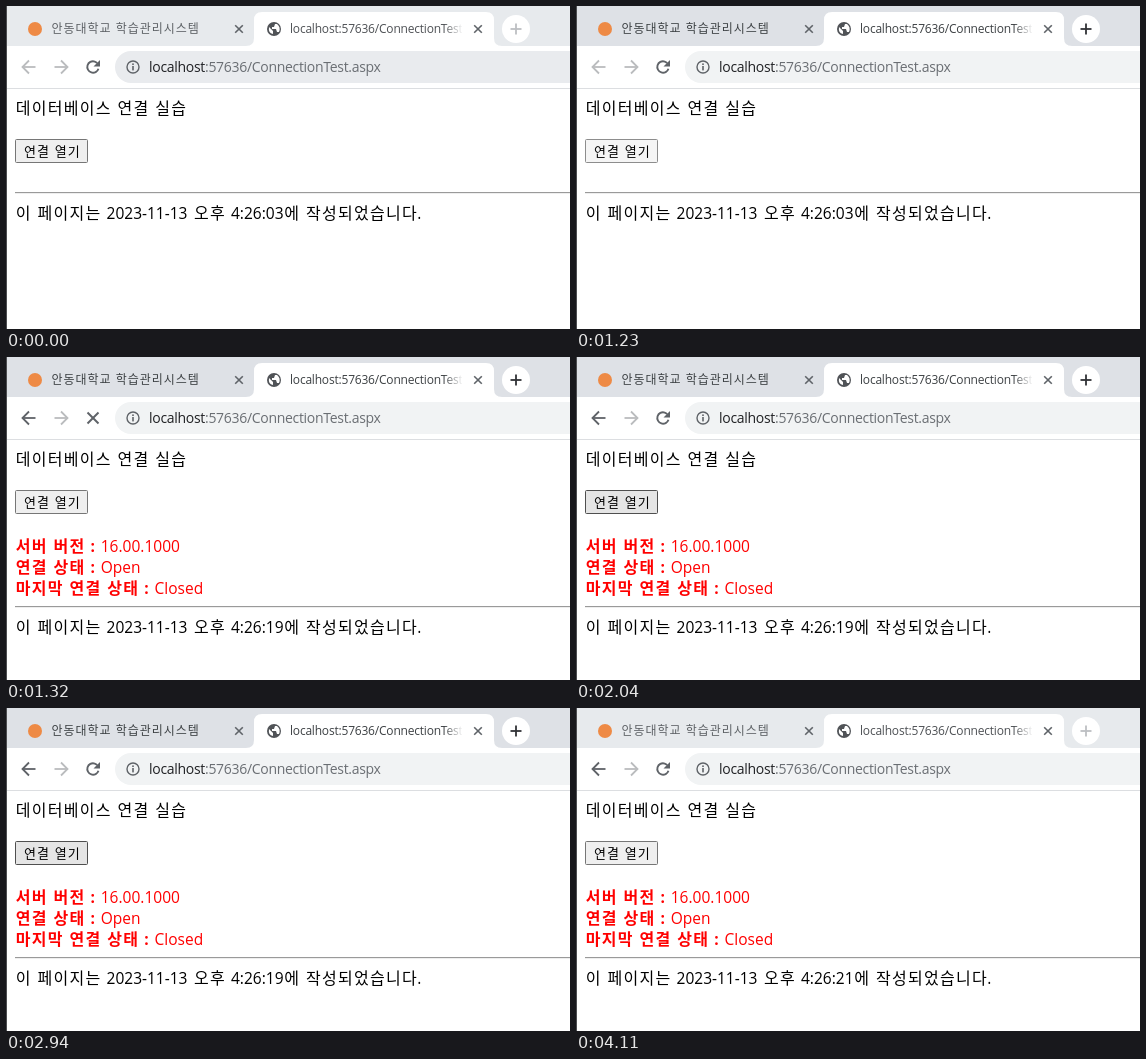
Recreate the animation shown at these times as an HTML page with a canvas. Size 564x323 px, loop 4.17 s.

```html
<!DOCTYPE html>
<html lang="ko">
<head>
<meta charset="utf-8">
<title>데이터베이스 연결 실습</title>
<style>
html, body { margin: 0; width: 100%; height: 100%; overflow: hidden; background: #fff; }
canvas { display: block; }
</style>
</head>
<body>
<canvas id="stage" width="564" height="323"></canvas>
<script>
const LOOP = 4170;
const ctx = document.getElementById('stage').getContext('2d', { alpha: false });
const LATIN = '"Open Sans", "Noto Sans", sans-serif';
const HANGUL = '"Noto Sans CJK KR", "Noto Sans CJK", sans-serif';
const ICON = '#5f6368', FAINT = '#babcbe';

const BUTTON = {
  normal: ['#efefef', '#767676'],
  hover: ['#e5e5e5', '#4f4f4f'],
  pressed: ['#f5f5f5', '#8d8d8d']
};

function rect(x, y, w, h, color) {
  ctx.fillStyle = color;
  ctx.fillRect(x, y, w, h);
}

function disc(x, y, r, color) {
  ctx.fillStyle = color;
  ctx.beginPath();
  ctx.arc(x, y, r, 0, Math.PI * 2);
  ctx.fill();
}

function line(points, color, width) {
  ctx.strokeStyle = color;
  ctx.lineWidth = width;
  ctx.beginPath();
  points.forEach(([x, y], i) => i ? ctx.lineTo(x, y) : ctx.moveTo(x, y));
  ctx.stroke();
}

function cross(x, y, r, color, width) {
  line([[x - r, y - r], [x + r, y + r]], color, width);
  line([[x - r, y + r], [x + r, y - r]], color, width);
}

function latin(str, x, y, size, color, weight = 400, spacing = 0) {
  ctx.fillStyle = color;
  ctx.font = `${weight} ${size}px ${LATIN}`;
  ctx.letterSpacing = spacing + 'px';
  ctx.fillText(str, x, y);
  const end = x + ctx.measureText(str).width;
  ctx.letterSpacing = '0px';
  return end;
}

// Hangul sits on a square pitch; Latin keeps its natural widths. Returns the end x.
function text(str, x, y, size, color, weight = 400) {
  for (const run of str.match(/[가-힣]+| +|[^가-힣 ]+/g)) {
    if (run[0] === ' ') {
      x += run.length * size * 0.36;
    } else if (/[가-힣]/.test(run)) {
      ctx.fillStyle = color;
      ctx.font = `${weight} ${size}px ${HANGUL}`;
      for (const ch of run) {
        ctx.fillText(ch, x + size * 0.04, y);
        x += size;
      }
    } else {
      x = latin(run, x, y, size * 0.97, color, weight);
    }
  }
  return x;
}

function globe(x, y) {
  disc(x, y, 7, '#505357');
  ctx.fillStyle = '#fff';
  ctx.fill(new Path2D(`M${x - 5} ${y - 2}l4 4v3q-5-1-4-7z
    M${x + 1} ${y - 5}l-1 3h-2v2h4l1 3h2q2-5-2-8z`));
}

function tabStrip(focused) {
  const idle = focused ? '#3c4043' : '#5d6165';
  const ink = focused ? '#3c4043' : '#4d5054';
  rect(0, 0, 564, 40, focused ? '#dee1e6' : '#e7eaed');
  ctx.fillStyle = '#fff';
  ctx.fill(new Path2D('M240 40q8 0 8-8V14q0-8 8-8H480q8 0 8 8V32q0 8 8 8z'));

  disc(29, 23, 7, '#ee8a45');
  text('안동대학교 학습관리시스템', 45, 27, 12, idle);
  cross(233, 23, 3.8, ICON, 1.6);

  globe(268, 23);
  const fade = ctx.createLinearGradient(438, 0, 457, 0);
  fade.addColorStop(0, ink);
  fade.addColorStop(1, '#fff');
  ctx.save();
  ctx.beginPath();
  ctx.rect(280, 8, 176, 30);
  ctx.clip();
  latin('localhost:57636/ConnectionTest.aspx', 284, 27, 12, fade, 400, -0.2);
  ctx.restore();
  cross(472, 23, 3.8, ICON, 1.6);

  const plus = focused ? '#303236' : '#bdbfc2';
  disc(510, 23, 14, '#fff');
  line([[504.5, 23], [515.5, 23]], plus, 1.8);
  line([[510, 17.5], [510, 28.5]], plus, 1.8);
}

function arrow(x, dir, color) {
  line([[x - 6.5 * dir, 61], [x + 6 * dir, 61]], color, 1.8);
  line([[x, 54.5], [x + 6.5 * dir, 61], [x, 67.5]], color, 1.8);
}

function reload(x, y) {
  ctx.strokeStyle = ICON;
  ctx.lineWidth = 1.9;
  ctx.beginPath();
  ctx.arc(x, y, 5.7, 0.3, Math.PI * 1.76);
  ctx.stroke();
  ctx.fillStyle = ICON;
  ctx.fill(new Path2D(`M${x + 7} ${y - 7}v6.5h-6.5z`));
}

function toolbar(canGoBack, loading, field) {
  rect(0, 40, 564, 42, '#fff');
  rect(0, 82, 564, 1, '#dcdee1');
  arrow(23, -1, canGoBack ? ICON : FAINT);
  arrow(55, 1, FAINT);
  if (loading) cross(87, 61, 5.5, ICON, 1.9);
  else reload(87, 61);

  ctx.fillStyle = field;
  ctx.beginPath();
  ctx.roundRect(109, 45, 480, 32, 16);
  ctx.fill();
  ctx.strokeStyle = ICON;
  ctx.lineWidth = 1.4;
  ctx.beginPath();
  ctx.arc(127, 61, 6, 0, Math.PI * 2);
  ctx.stroke();
  rect(126.2, 60, 1.6, 4.4, ICON);
  rect(126.2, 57.4, 1.6, 1.6, ICON);

  const x = latin('localhost', 143, 66, 14, '#202124', 400, -0.3);
  latin(':57636/ConnectionTest.aspx', x, 66, 14, '#6a6e73', 400, -0.3);
}

function button(state) {
  const [fill, border] = BUTTON[state];
  ctx.beginPath();
  ctx.roundRect(9.5, 133.5, 72, 23, 1);
  ctx.fillStyle = fill;
  ctx.fill();
  ctx.strokeStyle = border;
  ctx.lineWidth = 1;
  ctx.stroke();
  text('연결 열기', 17.5, 150, 13, '#000');
}

function field(label, value, y) {
  const x = text(label + ' : ', 9, y, 16, '#f00', 700);
  text(value, x, y, 16, '#f00');
}

function page(state, opened, seconds) {
  rect(0, 83, 564, 240, '#fff');
  text('데이터베이스 연결 실습', 9, 108, 16, '#000');
  button(state);
  if (opened) {
    field('서버 버전', '16.00.1000', 195);
    field('연결 상태', 'Open', 216);
    field('마지막 연결 상태', 'Closed', 237);
  }
  const y = opened ? 249 : 186;
  rect(9, y, 555, 1, '#9a9a9a');
  rect(9, y + 1, 555, 1, '#eeeeee');
  text(`이 페이지는 2023-11-13 오후 4:26:${seconds}에 작성되었습니다.`, 9, y + 27, 16, '#000');
}

function buttonState(t) {
  if (t < 900) return 'normal';
  if (t < 1230) return 'hover';
  if (t < 1290) return 'pressed';
  if (t < 1320) return 'hover';
  if (t < 2040) return 'normal';
  if (t < 2760) return 'hover';
  if (t < 2850) return 'pressed';
  return t < 3120 ? 'hover' : 'normal';
}

function draw(t) {
  const opened = t >= 1320;
  tabStrip(t >= 1230 && t < 4110);
  toolbar(opened, opened && t < 1350, t < 1230 ? '#e9ebee' : '#f1f3f4');
  page(buttonState(t), opened, !opened ? '03' : t < 3120 ? '19' : '21');
  rect(0, 0, 1, 323, '#4c4d50');
}

const start = performance.now();
function tick() {
  draw((performance.now() - start) % LOOP);
  requestAnimationFrame(tick);
}
tick();
</script>
</body>
</html>
```
